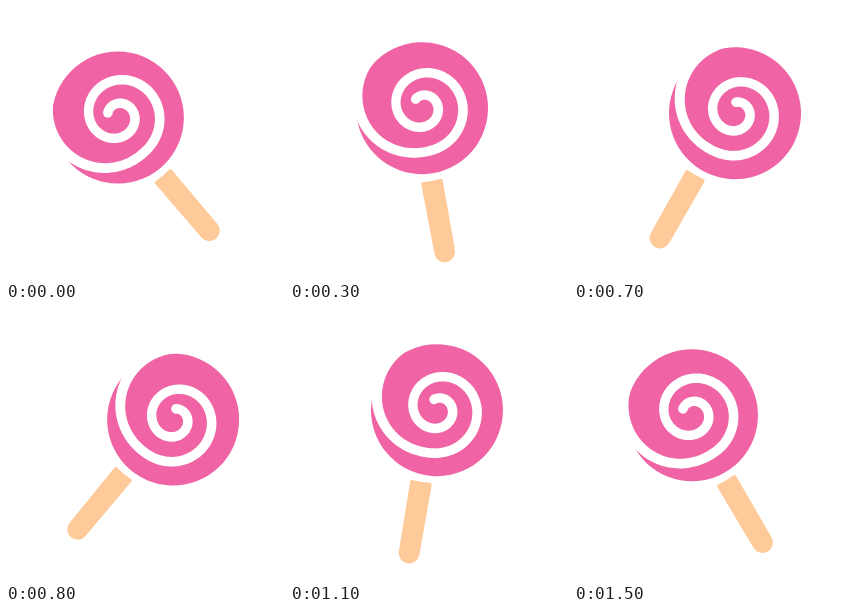
An HTML page for the animation above (1.6 s loop, 278x274 px).

```html
<!DOCTYPE html>
<html lang="en">
<head>
<meta charset="utf-8">
<title>Swinging lollipop</title>
<style>
  html, body { margin: 0; width: 100%; height: 100%; overflow: hidden; background: #fff; }
  svg { display: block; width: 100vw; height: 100vh; }
</style>
</head>
<body>
<svg viewBox="0 0 278 274">
  <g id="pop">
    <path d="M-12.3 30 Q-3.2 31 6 29.7 Q7.8 29.8 7.8 31.6 V102.5 A10.4 10.4 0 0 1 -13 102.5 L-14 31.8 Q-14 30 -12.3 30Z" fill="#ffca9a"/>
    <g transform="translate(0 -43) rotate(40)">
      <circle r="66" fill="#f063a4"/>
      <path id="swirl" fill="#fff"/>
      <circle id="tip" fill="#fff"/>
    </g>
  </g>
</svg>
<script>
const STEP = 100, HALF = 8, SWING = 40;
const INNER = -515, OUTER = 215, HALF_WIDTH = 4.8;
const $ = id => document.getElementById(id);
const rad = deg => deg * Math.PI / 180;

function smooth(from, to, x) {
  const t = Math.min(1, Math.max(0, (x - from) / (to - from)));
  return t * t * (3 - 2 * t);
}

// Flare that carries the groove out through the rim.
const flare = deg => smooth(45, 195, deg);

// Centre line: an off-centre spiral, opened a little at both ends.
function radius(deg) {
  const d = deg + 170;
  const curl = Math.min(0, deg + 370);
  return 29.7 + 0.069 * d + 2.4 * Math.sin(rad(d)) + 17 * flare(deg) + 0.00022 * curl * curl;
}

function point(deg, side) {
  const r = radius(deg) + side * (HALF_WIDTH + 0.7 * flare(deg));
  return [r * Math.cos(rad(deg)), r * Math.sin(rad(deg))];
}

function buildSwirl() {
  const near = [], far = [];
  for (let deg = INNER; deg <= OUTER; deg += 2) {
    near.push(point(deg, -1));
    far.unshift(point(deg, 1));
  }
  const pts = near.concat(far).map(p => p.map(v => v.toFixed(2)).join(' '));
  $('swirl').setAttribute('d', 'M' + pts.join('L') + 'Z');

  const [x, y] = point(INNER, 0);
  $('tip').setAttribute('cx', x);
  $('tip').setAttribute('cy', y);
  $('tip').setAttribute('r', HALF_WIDTH);
}

function draw(ms) {
  const k = Math.floor(ms / STEP) % (2 * HALF);
  const angle = SWING * (1 - 2 * Math.abs(k - HALF) / HALF);
  pop.setAttribute('transform', `translate(139.5 144.5) rotate(${angle})`);
}

const pop = $('pop');
const start = performance.now();

function tick() {
  draw(performance.now() - start);
  requestAnimationFrame(tick);
}

buildSwirl();
tick();
</script>
</body>
</html>
```
